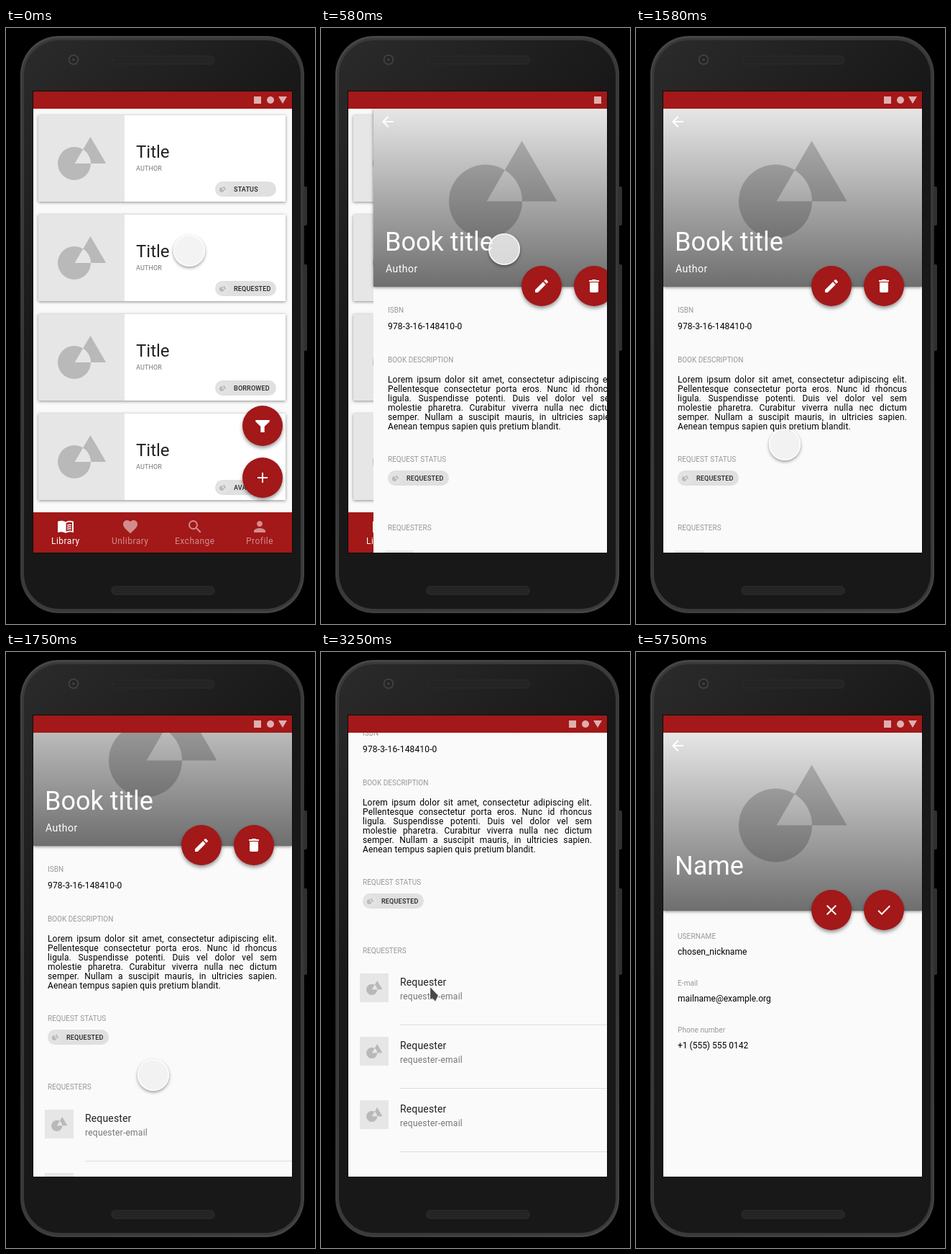
Write an HTML page with a canvas that moves like this. It is 430 px wide and 827 px high and loops after 8.51 s.

```html
<!DOCTYPE html>
<html lang="en">
<head>
<meta charset="utf-8">
<title>Book app walkthrough</title>
<style>
html, body { margin: 0; width: 100%; height: 100%; overflow: hidden; background: #000; }
canvas { display: block; width: 430px; height: 827px; }
</style>
</head>
<body>
<canvas id="stage"></canvas>
<script>
const W = 430, H = 827, LOOP = 8510, FPS = 12;
const RED = '#a31818', PAGE = '#fafafa', TILE = '#e6e6e6', SHAPE = '#b9b9b9';
const SCREEN = { x: 38, y: 88, w: 360, h: 640 };
const canvas = document.getElementById('stage');
const ctx = canvas.getContext('2d');
const dpr = window.devicePixelRatio || 1;
canvas.width = W * dpr;
canvas.height = H * dpr;

const ICONS = {
  back: 'M20 11H7.83l5.59-5.59L12 4l-8 8 8 8 1.41-1.41L7.83 13H20v-2z',
  edit: 'M3 17.25V21h3.75L17.81 9.94l-3.75-3.75L3 17.25zM20.71 7.04a1 1 0 0 0 0-1.41l-2.34-2.34a1 1 0 0 0-1.41 0l-1.83 1.83 3.75 3.75 1.83-1.83z',
  trash: 'M6 19c0 1.1.9 2 2 2h8c1.1 0 2-.9 2-2V7H6v12zM19 4h-3.5l-1-1h-5l-1 1H5v2h14V4z',
  close: 'M19 6.41L17.59 5 12 10.59 6.41 5 5 6.41 10.59 12 5 17.59 6.41 19 12 13.41 17.59 19 19 17.59 13.41 12z',
  check: 'M9 16.17L4.83 12l-1.42 1.41L9 19 21 7l-1.41-1.41z',
  add: 'M19 13h-6v6h-2v-6H5v-2h6V5h2v6h6v2z',
  filter: 'M2.3 4h19.4v2.2L14.7 13v8h-5.4v-8L2.3 6.2z',
  book: 'M12 5.5C9.5 3.6 4.5 3.3 1 4.8V20c3-1.3 8-1 11 .8 3-1.8 8-2.1 11-.8V4.8C19.5 3.3 14.5 3.6 12 5.5zM21 18c-2.6-.8-6-.4-8.4.8V7.2C15 5.9 18.4 5.4 21 6.2zM14 9.2c1.8-.7 3.8-.9 5.8-.6v1.5c-2-.3-4-.1-5.8.6zM14 12c1.8-.7 3.8-.9 5.8-.6v1.5c-2-.3-4-.1-5.8.6zM14 14.8c1.8-.7 3.8-.9 5.8-.6v1.5c-2-.3-4-.1-5.8.6z',
  heart: 'M12 21.35l-1.45-1.32C5.4 15.36 2 12.28 2 8.5 2 5.42 4.42 3 7.5 3c1.74 0 3.41.81 4.5 2.09C13.09 3.81 14.76 3 16.5 3 19.58 3 22 5.42 22 8.5c0 3.78-3.4 6.86-8.55 11.54L12 21.35z',
  search: 'M15.5 14h-.79l-.28-.27A6.47 6.47 0 0 0 16 9.5 6.5 6.5 0 1 0 9.5 16c1.61 0 3.09-.59 4.23-1.57l.27.28v.79l5 4.99L20.49 19l-4.99-5zm-6 0C7.01 14 5 11.99 5 9.5S7.01 5 9.5 5 14 7.01 14 9.5 11.99 14 9.5 14z',
  person: 'M12 12c2.21 0 4-1.79 4-4s-1.79-4-4-4-4 1.79-4 4 1.79 4 4 4zm0 2c-2.67 0-8 1.34-8 4v2h16v-2c0-2.66-5.33-4-8-4z'
};
for (const k in ICONS) ICONS[k] = new Path2D(ICONS[k]);

const LOREM = [
  'Lorem ipsum dolor sit amet, consectetur adipiscing elit.',
  'Pellentesque consectetur porta eros. Nunc id rhoncus',
  'ligula. Suspendisse potenti. Duis vel dolor vel sem',
  'molestie pharetra. Curabitur viverra nulla nec dictum',
  'semper. Nullam a suscipit mauris, in ultricies sapien.',
  'Aenean tempus sapien quis pretium blandit.'
];

// Keys are [tick, value...], one tick being a twelfth of a second.
const SCROLL = [[19, 0], [21, 90], [22, 90], [24, 159], [32, 159], [36, 279]];
const TOUCH = [[3, 255, 309], [7, 255, 307], [10, 255, 307], [19, 207, 578], [21, 205, 587],
  [32, 205, 587], [36, 145, 477], [50, 145, 477], [51, 197, 605], [65, 197, 605], [68, 18, 130]];

function at(keys, tick) {
  if (tick <= keys[0][0]) return keys[0].slice(1);
  for (let i = 1; i < keys.length; i++) {
    const a = keys[i - 1], b = keys[i];
    if (tick <= b[0]) {
      const p = (tick - a[0]) / (b[0] - a[0]);
      return a.slice(1).map((v, j) => Math.round(v + (b[j + 1] - v) * p));
    }
  }
  return keys[keys.length - 1].slice(1);
}

function rect(x, y, w, h, fill) {
  ctx.fillStyle = fill;
  ctx.fillRect(x, y, w, h);
}

function round(x, y, w, h, r, fill) {
  ctx.beginPath();
  ctx.roundRect(x, y, w, h, r);
  ctx.fillStyle = fill;
  ctx.fill();
}

function disc(x, y, r, fill) {
  ctx.beginPath();
  ctx.arc(x, y, r, 0, 7);
  ctx.fillStyle = fill;
  ctx.fill();
}

function poly(points, fill) {
  ctx.beginPath();
  points.forEach(([x, y]) => ctx.lineTo(x, y));
  ctx.closePath();
  ctx.fillStyle = fill;
  ctx.fill();
}

function shaded(dy, blur, alpha, draw) {
  ctx.save();
  ctx.shadowColor = `rgba(0,0,0,${alpha})`;
  ctx.shadowBlur = blur * dpr;
  ctx.shadowOffsetY = dy * dpr;
  draw();
  ctx.restore();
}

function setFont(size, spacing = 0, weight = 400) {
  ctx.font = `${weight} ${size}px Roboto, sans-serif`;
  ctx.letterSpacing = spacing + 'px';
}

function text(str, x, y, size, fill, spacing, weight) {
  setFont(size, spacing, weight);
  ctx.fillStyle = fill;
  ctx.fillText(str, x, y);
}

function justify(str, x, y, width) {
  const words = str.split(' ');
  const used = words.reduce((sum, w) => sum + ctx.measureText(w).width, 0);
  const gap = (width - used) / (words.length - 1);
  for (const w of words) {
    ctx.fillText(w, x, y);
    x += ctx.measureText(w).width + gap;
  }
}

function icon(name, cx, cy, fill = '#fff', size = 24) {
  ctx.save();
  ctx.translate(cx - size / 2, cy - size / 2);
  ctx.scale(size / 24, size / 24);
  ctx.fillStyle = fill;
  ctx.fill(ICONS[name], name === 'book' ? 'evenodd' : 'nonzero');
  ctx.restore();
}

// Circle and triangle whose overlap stays empty.
function emblem(cx, cy, r, base, height, fill) {
  ctx.beginPath();
  ctx.arc(cx, cy, r, 0, Math.PI * 2);
  ctx.closePath();
  ctx.moveTo(cx + r * 0.03, cy);
  ctx.lineTo(cx + r * 0.03 + base, cy);
  ctx.lineTo(cx + r * 0.03 + base / 2, cy - height);
  ctx.closePath();
  ctx.fillStyle = fill;
  ctx.fill('evenodd');
}

function tile(x, y, size) {
  const s = size / 120;
  rect(x, y, size, size, TILE);
  emblem(x + 50 * s, y + 67 * s, 23 * s, 43.5 * s, 37 * s, SHAPE);
}

function chip(x, y, label) {
  round(x, y, 85, 21, 10.5, '#e0e0e0');
  disc(x + 10.5, y + 10.5, 9, '#e3e3e3');
  emblem(x + 9.2, y + 11.6, 3.3, 6.2, 5.3, SHAPE);
  text(label, x + 26, y + 13.6, 9, '#222', 0.2, 500);
}

function fab(name, x, y) {
  shaded(3, 5, 0.4, () => disc(x, y, 28, RED));
  icon(name, x, y);
}

function statusBar() {
  const tint = 'rgba(255,255,255,.65)';
  rect(38, 88, 360, 24, RED);
  rect(345, 95, 10, 10, tint);
  disc(368, 100, 5, tint);
  poly([[379, 95], [391, 95], [385, 105]], tint);
}

function library() {
  rect(38, 112, 360, 616, PAGE);
  ['STATUS', 'REQUESTED', 'BORROWED', 'AVAILABLE'].forEach((state, i) => {
    const y = 121 + i * 138;
    shaded(1, 4, 0.45, () => rect(45, y, 344, 120, '#fff'));
    tile(45, y, 120);
    text('Title', 181, y + 59, 24, '#212121');
    text('AUTHOR', 181, y + 77, 9, '#757575', 0.15);
    chip(291, y + 92, state);
  });
  fab('filter', 357, 552);
  fab('add', 357, 624);
  rect(38, 672, 360, 56, RED);
  [['book', 'Library', 63], ['heart', 'Unlibrary', 147], ['search', 'Exchange', 235], ['person', 'Profile', 334]]
    .forEach(([name, label, x], i) => {
      const fill = i ? 'rgba(255,255,255,.5)' : '#fff';
      icon(name, 83 + i * 90, 692, fill);
      text(label, x, 716, 12, fill, 0.48);
    });
  statusBar();
}

function header(title) {
  shaded(1, 4, 0.5, () => rect(38, 112, 360, 247, TILE));
  emblem(194, 240.5, 51, 98, 84, SHAPE);
  const g = ctx.createLinearGradient(0, 112, 0, 359);
  g.addColorStop(0, 'rgba(0,0,0,0)');
  g.addColorStop(1, 'rgba(0,0,0,.52)');
  rect(38, 112, 360, 247, g);
  icon('back', 58, 130);
  text(title, 54, 309, 36, '#fff');
}

const label = (str, y, spacing) => text(str, 58, y, 10, '#979797', spacing);

function book(scroll) {
  rect(38, 112, 360, 616, PAGE);
  ctx.save();
  ctx.translate(0, -scroll);
  header('Book title');
  text('Author', 55, 339, 14, '#fff', 0.5);
  fab('edit', 272, 358);
  fab('trash', 345, 358);
  label('ISBN', 395);
  text('978-3-16-148410-0', 58, 418, 12, '#000', 0.15);
  label('BOOK DESCRIPTION', 463.5);
  setFont(12, 0.16);
  ctx.fillStyle = '#000';
  LOREM.forEach((line, i) => {
    const y = 492 + i * 13;
    if (i < 5) justify(line, 58, y, 319);
    else ctx.fillText(line, 58, y);
  });
  label('REQUEST STATUS', 602);
  chip(58, 614, 'REQUESTED');
  label('REQUESTERS', 697);
  for (let i = 0; i < 3; i++) {
    const y = 725 + i * 88;
    tile(54, y, 40);
    text('Requester', 110, y + 17, 14, '#212121', 0.15);
    text('requester-email', 110, y + 36, 12, '#757575', 0.25);
    rect(110, y + 71, 288, 1, '#dcdcdc');
  }
  ctx.restore();
  statusBar();
}

function contact() {
  rect(38, 112, 360, 616, PAGE);
  header('Name');
  fab('close', 272, 358);
  fab('check', 345, 358);
  [['USERNAME', 'chosen_nickname'], ['E-mail', 'mailname@example.org'], ['Phone number', '+1 (555) 555 0142']]
    .forEach(([name, value], i) => {
      label(name, 397.5 + i * 65, 0.1);
      text(value, 58, 420 + i * 65, 12, '#000');
    });
  statusBar();
}

function grille(y) {
  round(146, y, 145, 13, 6.5, '#272727');
  ctx.fillStyle = '#1d1d1d';
  for (let i = 0; i < 46; i++)
    for (let j = 0; j < 3; j++) ctx.fillRect(150.5 + i * 3 + (j % 2) * 1.5, y + 2.5 + j * 3, 1.3, 1.3);
}

function phone() {
  rect(0, 0, W, H, '#000');
  round(413, 220, 6, 54, 2, '#303030');
  round(413, 328, 6, 120, 2, '#303030');
  const rim = ctx.createLinearGradient(20, 11, 415, 812);
  rim.addColorStop(0, '#484848');
  rim.addColorStop(0.5, '#303030');
  rim.addColorStop(1, '#454545');
  round(20, 11, 395, 801, 54, rim);
  round(22, 14, 391, 795, 52, '#393939');
  const body = ctx.createLinearGradient(24, 16, 250, 240);
  body.addColorStop(0, '#2b2b2b');
  body.addColorStop(1, '#181818');
  round(25, 17, 385, 789, 49, body);
  grille(38);
  grille(774);
  disc(94, 44, 7.5, '#3d3d3d');
  disc(94, 44, 5, '#202020');
  disc(94, 44, 2.5, '#393939');
  rect(37, 87, 362, 642, '#0d0d0d');
}

function touch(x, y) {
  ctx.save();
  ctx.beginPath();
  ctx.rect(0, 0, W, H);
  ctx.arc(x, y, 22, 0, Math.PI * 2);
  ctx.clip('evenodd');
  shaded(2, 4, 0.4, () => disc(x, y, 22, '#fff'));
  ctx.restore();
  disc(x, y, 21.5, 'rgba(240,240,240,.8)');
  ctx.beginPath();
  ctx.arc(x, y, 21.2, 0, 7);
  ctx.strokeStyle = 'rgba(255,255,255,.85)';
  ctx.lineWidth = 1.5;
  ctx.stroke();
}

function arrow(x, y) {
  poly([[x, y], [x, y + 17], [x + 3.5, y + 15.5], [x + 7, y + 20], [x + 10, y + 14], [x + 11, y + 11.5]], '#484848');
  ctx.strokeStyle = 'rgba(255,255,255,.5)';
  ctx.lineWidth = 0.7;
  ctx.stroke();
}

function draw(ms) {
  const tick = Math.floor(ms * FPS / 1000 + 0.05);
  ctx.setTransform(dpr, 0, 0, dpr, 0, 0);
  phone();
  ctx.save();
  ctx.beginPath();
  ctx.rect(SCREEN.x, SCREEN.y, SCREEN.w, SCREEN.h);
  ctx.clip();
  if (tick < 8) library();
  if (tick > 3 && tick < 51) {
    const p = Math.min(1, (tick - 3) / 5);
    ctx.translate(Math.ceil(SCREEN.w * (1 + Math.cos(Math.PI * p)) / 2), 0);
    book(at(SCROLL, tick)[0]);
  }
  if (tick >= 51) contact();
  ctx.restore();
  if (tick >= 39 && tick < 51) arrow(152, 465);
  else if (tick < 69) touch(...at(TOUCH, tick));
}

const start = performance.now();
function loop() {
  draw((performance.now() - start) % LOOP);
  requestAnimationFrame(loop);
}
loop();
</script>
</body>
</html>
```
